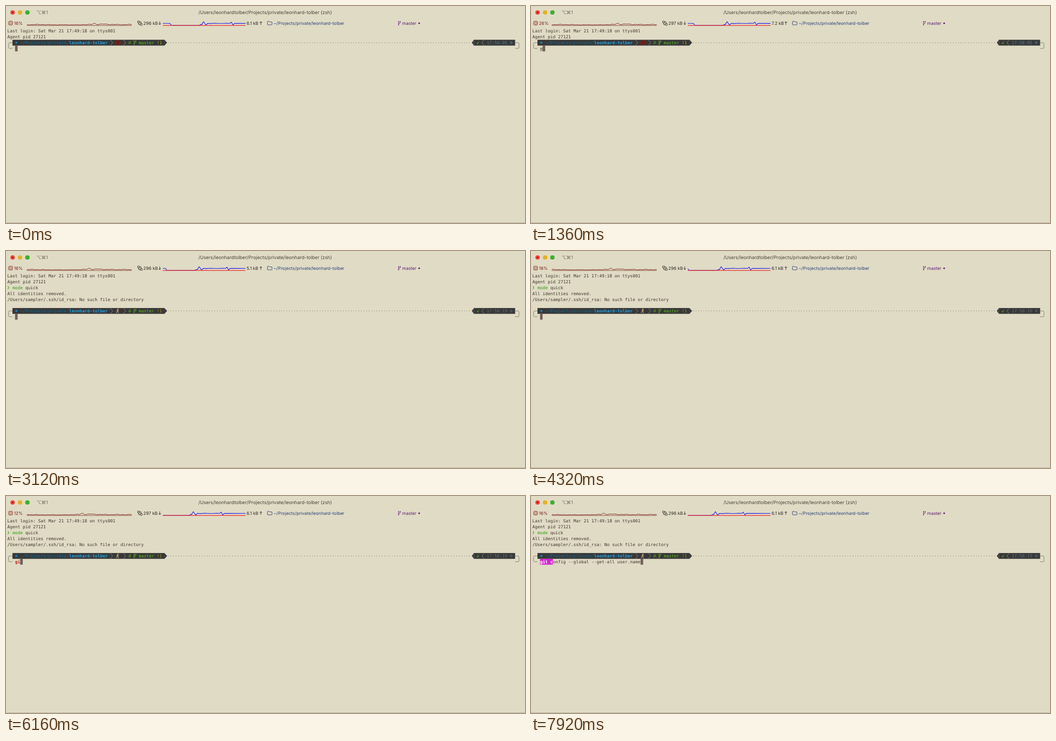
Write an HTML page that moves like this. It is 960 px wide and 403 px high and loops after 8 s.

```html
<!DOCTYPE html>
<html lang="en">
<head>
<meta charset="utf-8">
<title>Terminal</title>
<style>
html, body { margin: 0; width: 100%; height: 100%; overflow: hidden; background: #e0dbc5; }
svg { display: block; width: 100vw; height: 100vh; }
text { white-space: pre; text-rendering: geometricPrecision; }
.mono { font: 7.92px "DejaVu Sans Mono", monospace; fill: #40382f; }
.ui { font: 8.1px Inter, sans-serif; }
.bold { font-weight: bold; }
.line { fill: none; stroke-width: .9; stroke-linejoin: round; }
</style>
</head>
<body>
<svg viewBox="0 0 960 403">
  <defs>
    <clipPath id="cpuClip"><rect x="38.5" y="26" width="194" height="11"/></clipPath>
    <clipPath id="netClip"><rect x="290" y="26" width="153" height="11"/></clipPath>
    <g id="branch" class="line">
      <path d="M1 .8V7.2M4 .8V2.6Q4 4.4 1 4.8"/>
      <circle cx="1" cy="1" r=".55"/><circle cx="4" cy="1" r=".55"/><circle cx="1" cy="7" r=".55"/>
    </g>
  </defs>
  <rect width="960" height="403" fill="#e0dbc5"/>
  <path d="M0 402.6H960" stroke="#aaa594" stroke-width=".8"/>

  <!-- title bar -->
  <circle cx="12.2" cy="12" r="4.1" fill="#f2433b"/>
  <circle cx="12.2" cy="12" r="1.3" fill="#7c1510"/>
  <circle cx="26" cy="12" r="4.1" fill="#e2b322"/>
  <circle cx="39.6" cy="12" r="4.1" fill="#3fae2e"/>
  <text x="56.5" y="15.2" font-size="8.6" font-family="Inter, 'DejaVu Sans', sans-serif" fill="#6d685b">⌥⌘1</text>
  <text x="479.4" y="15.2" class="ui" style="font-size:8.66px" text-anchor="middle" fill="#47433a">/Users/leonhardtolber/Projects/private/leonhard-tolber (zsh)</text>

  <!-- status bar -->
  <g class="line" stroke="#8a2a20">
    <rect x="5" y="28.3" width="7" height="7" rx="1.2"/>
    <rect x="6.8" y="30.1" width="3.4" height="3.4" stroke-width=".6"/>
  </g>
  <text id="cpu" x="14.7" y="35" class="ui" fill="#74201a"></text>
  <g clip-path="url(#cpuClip)"><polyline id="cpuLine" class="line" stroke="#7d2a24"/></g>
  <path d="M38.5 36.1H232.5" stroke="#7d2a24" stroke-width=".8"/>
  <g class="line" stroke="#3b362e">
    <rect x="243.5" y="28" width="3.6" height="3.2"/><rect x="248.3" y="32.6" width="3.6" height="3.2"/>
    <path d="M245.3 31.2V34.4H248.3M247.1 29.6H250V32.6"/>
  </g>
  <text id="down" x="254" y="35" class="ui" fill="#2f2b25"></text>
  <path class="line" stroke="#2f2b25" d="M284.4 28.7V34.5M282.2 32.4L284.4 34.7L286.6 32.4"/>
  <g clip-path="url(#netClip)"><polyline id="netLine" class="line" style="stroke-width:1.1" stroke="#2222e6"/></g>
  <path d="M290 36.1H443" stroke="#f0302c" stroke-width="1.2"/>
  <text id="up" x="445" y="35" class="ui" fill="#2f2b25"></text>
  <path class="line" stroke="#2f2b25" d="M471.4 34.9V29.1M469.2 31.2L471.4 28.9L473.6 31.2"/>
  <path class="line" stroke="#2b4478" d="M483.7 34.2V29.2Q483.7 28.4 484.5 28.4H486.6L487.6 29.5H491.2Q492 29.5 492 30.3V34.2Q492 35 491.2 35H484.5Q483.7 35 483.7 34.2Z"/>
  <text x="495" y="35" class="ui" fill="#2b4478">~/Projects/private/leonhard-tolber</text>
  <use href="#branch" x="725.2" y="28" stroke="#6a2480"/>
  <text x="732.8" y="35" class="ui" fill="#5d1f72">master</text>
  <circle cx="764.2" cy="32" r="1.6" fill="#5d1f72"/>

  <g id="term"></g>
</svg>
<script>
const CELL = 4.768, ROW = 10.8, LOOP = 8000;
const $ = id => document.getElementById(id);
const X = col => 2.4 + col * CELL;
const top_ = row => 41.1 + row * ROW;
const GREEN = '#2f9c12', RED = '#c4231a', INK = '#40382f';

const text = (col, row, s, fill = INK, bold = false) =>
  `<text class="mono${bold ? ' bold' : ''}" x="${X(col)}" y="${top_(row) + 8.2}" style="fill:${fill}">${s}</text>`;
const rect = (col, row, cols, fill) =>
  `<rect x="${X(col)}" y="${top_(row)}" width="${cols * CELL}" height="${ROW}" fill="${fill}"/>`;
const stroke = (d, color, w = .8) =>
  `<path class="line" style="stroke-width:${w}" stroke="${color}" d="${d}"/>`;

const maskIcon = (x, y) =>
  `<rect x="${x}" y="${y + 1.2}" width="9" height="8.4" rx="2.6" fill="#7a1f19"/>
   <path d="M${x + 2} ${y + 4}h1.8m1.4 0h1.8m-4 3h2.8" stroke="#48110e" stroke-width="1"/>`;
const runnerIcon = (x, y) =>
  `<circle cx="${x + 4.4}" cy="${y + 2.4}" r="1.3" fill="#c9a35e"/>` +
  stroke(`M${x + 4} ${y + 3.8}L${x + 3.4} ${y + 6.2}`, '#c9b58e', 1.7) +
  stroke(`M${x + 1.2} ${y + 5.2}L${x + 3.6} ${y + 4.2}L${x + 6.2} ${y + 5.4}`, '#d3a765') +
  stroke(`M${x + 3.4} ${y + 6.2}L${x + 5.4} ${y + 7.4}L${x + 5} ${y + 9.4}M${x + 3.3} ${y + 6.4}L${x + 2.5} ${y + 8.2}L${x + .6} ${y + 8.4}`, '#b9a88c', 1);

function prompt(row, icon, clock, clockColor, warnColor) {
  const y = top_(row), mid = y + ROW / 2, low = mid + ROW, bot = y + ROW;
  const dark = '#383838', frame = '#77715f';
  const chevron = (col, dir) => {
    const x = X(col) + CELL / 2, k = 2 * dir;
    return stroke(`M${x - k} ${y + .6}L${x + k} ${mid}L${x - k} ${bot - .6}`, '#8f8f89');
  };
  const l = X(.5), r = X(198.5), a = X(2), b = X(197);
  return stroke(`M${a} ${mid}H${l + 2}Q${l} ${mid} ${l} ${mid + 2}V${low - 2}Q${l} ${low} ${l + 2} ${low}H${a}`, frame) +
    stroke(`M${b} ${mid}H${r - 2}Q${r} ${mid} ${r} ${mid + 2}V${low - 2}Q${r} ${low} ${r - 2} ${low}H${b}`, frame) +
    rect(2, row, 59, dark) +
    `<path d="M${X(61) - .1} ${y}L${X(62)} ${mid}L${X(61) - .1} ${bot}Z" fill="${dark}"/>` +
    `<circle cx="${X(3.5)}" cy="${mid}" r="2" fill="#1a82b4"/>` +
    text(5, row, '~/Projects/private/', '#0f6f9a') +
    text(24, row, 'leonhard-tolber', '#22a0e2', true) +
    chevron(40, 1) + icon(X(42), y) + chevron(45, 1) +
    stroke(`M${X(47)} ${mid - 1.2}h4.4l-1.5 -1.5M${X(48)} ${mid + 1.2}h-4.4l1.5 1.5`, '#5cbf1c') +
    `<use href="#branch" x="${X(49)}" y="${mid - 4}" stroke="#5cbf1c"/>` +
    text(51, row, 'master', '#5cbf1c') + text(58, row, '!1', warnColor) +
    text(62, row, '·'.repeat(118), '#7d7766') +
    rect(181, row, 16, dark) +
    `<path d="M${X(181) + .1} ${y}L${X(180) + 1} ${mid}L${X(181) + .1} ${bot}Z" fill="${dark}"/>` +
    stroke(`M${X(182) + .8} ${mid + .4}l1.3 1.8l2.2 -4`, '#5ba51c', 1.1) +
    chevron(184, -1) + text(186, row, clock, clockColor) +
    `<circle class="line" cx="${X(195.5)}" cy="${mid}" r="2" stroke="${clockColor}" stroke-width=".7"/>` +
    stroke(`M${X(195.5)} ${mid - 1.2}v1.2h1`, clockColor, .6);
}

const login = text(0, 0, 'Last login: Sat Mar 21 17:49:18 on ttys001') + text(0, 1, 'Agent pid 27121');
const before = login + prompt(2, maskIcon, '17:50:05', '#557f90', '#b9a81c');
const after = login +
  stroke(`M${X(0) + 1} ${top_(2) + 2.6}l2 2.8l-2 2.8`, '#47b81c', 1.2) +
  text(2, 2, 'mode', GREEN) + text(7, 2, 'quick') +
  text(0, 3, 'All identities removed.') +
  text(0, 4, '/Users/sampler/.ssh/id_rsa: No such file or directory') +
  prompt(6, runnerIcon, '17:50:19', '#5d7076', '#a08f18');

// number of characters typed, given the time of the first one and the pace
const typed = (t, start, pace, max) => t < start ? 0 : Math.min(max, 1 + Math.floor((t - start) / pace));
const ENTER = 2800, RECALL = 7000;

function command(t) {
  if (t < ENTER) {
    const n = t < 1440 ? typed(t, 1280, 1e4, 1) : 1 + typed(t, 1440, 90, 9);
    return { row: 3, s: 'mode quick'.slice(0, n), word: 4 };
  }
  if (t >= RECALL) return { row: 7, s: 'git config --global --get-all user.name', word: 3, found: 5 };
  return { row: 7, s: 'git c'.slice(0, typed(t, 5920, 150, 5)), word: 3 };
}

function drawCommand({ row, s, word, found }) {
  let out = '';
  if (found) {
    out += rect(3, row, found, '#d422d0') + text(3, row, s.slice(0, found), '#fff', true) +
      text(3 + found, row, s.slice(found));
  } else if (s === 'm') {
    out += text(3, row, s) + stroke(`M${X(3)} ${top_(row) + 9.6}h${CELL}`, INK, .6);
  } else {
    const done = s.length >= word;
    out += text(3, row, s.slice(0, word), done ? GREEN : RED, !done) + text(3 + word, row, s.slice(word));
  }
  return out + rect(3 + s.length, row, 1, '#705f57');
}

// one sample arrives per tick and the charts move left
const TICK = 900, FIRST = 600;
const cpuLoad = [16, 26, 19, 16, 17, 18, 14, 12, 15, 16];
const upRate = ['6.1', '7.2', '7.2', '5.1', '6.1', '6.1', '6.1', '6.1', '6.1', '6.1'];
const netShape = [[280, 32.2], [303, 32.2], [306, 36], [358, 36], [360, 34.2], [362, 34.6], [365.3, 29],
  [370, 35.6], [373, 32.2], [378, 32.6], [386, 32], [398, 32.5], [408, 32], [414, 32.3], [417, 30],
  [420, 35.5], [422.5, 32.2], [432, 32.4], [480, 32.2]];

function cpuY(i) {
  const wave = Math.sin(i * 1.9) * .4 + Math.sin(i * .83) * .35;
  const peak = 3 * Math.exp(-((i - 38.6) ** 2) * 1.4);
  const hill = .9 * Math.exp(-((i - 44) ** 2) / 14);
  const calm = i > 12 && i < 31 ? .4 : 1;
  return 34.5 + (calm < 1 ? .4 : 0) + wave * calm - peak - hill;
}
const cpuShape = Array.from({ length: 75 }, (_, i) => [39 + i * 3.22, cpuY(i)]);
$('cpuLine').setAttribute('points', cpuShape.join(' '));
$('netLine').setAttribute('points', netShape.join(' '));

let lastTick = -1, lastKey = '';
function render(t) {
  const k = t < FIRST ? 0 : 1 + Math.floor((t - FIRST) / TICK);
  if (k !== lastTick) {
    lastTick = k;
    $('cpu').textContent = cpuLoad[k] + '%';
    $('down').textContent = ([1, 2, 6, 7].includes(k) ? 297 : 296) + ' kB';
    $('up').textContent = upRate[k] + ' kB';
    $('cpuLine').setAttribute('transform', `translate(${-3.22 * k})`);
    $('netLine').setAttribute('transform', `translate(${-2.7 * k})`);
  }
  const cmd = command(t), key = cmd.row + cmd.s;
  if (key !== lastKey) {
    lastKey = key;
    $('term').innerHTML = (t < ENTER ? before : after) + drawCommand(cmd);
  }
}

const start = performance.now();
function loop(now) {
  render(Math.max(0, now - start) % LOOP);
  requestAnimationFrame(loop);
}
render(0);
requestAnimationFrame(loop);
</script>
</body>
</html>
```
